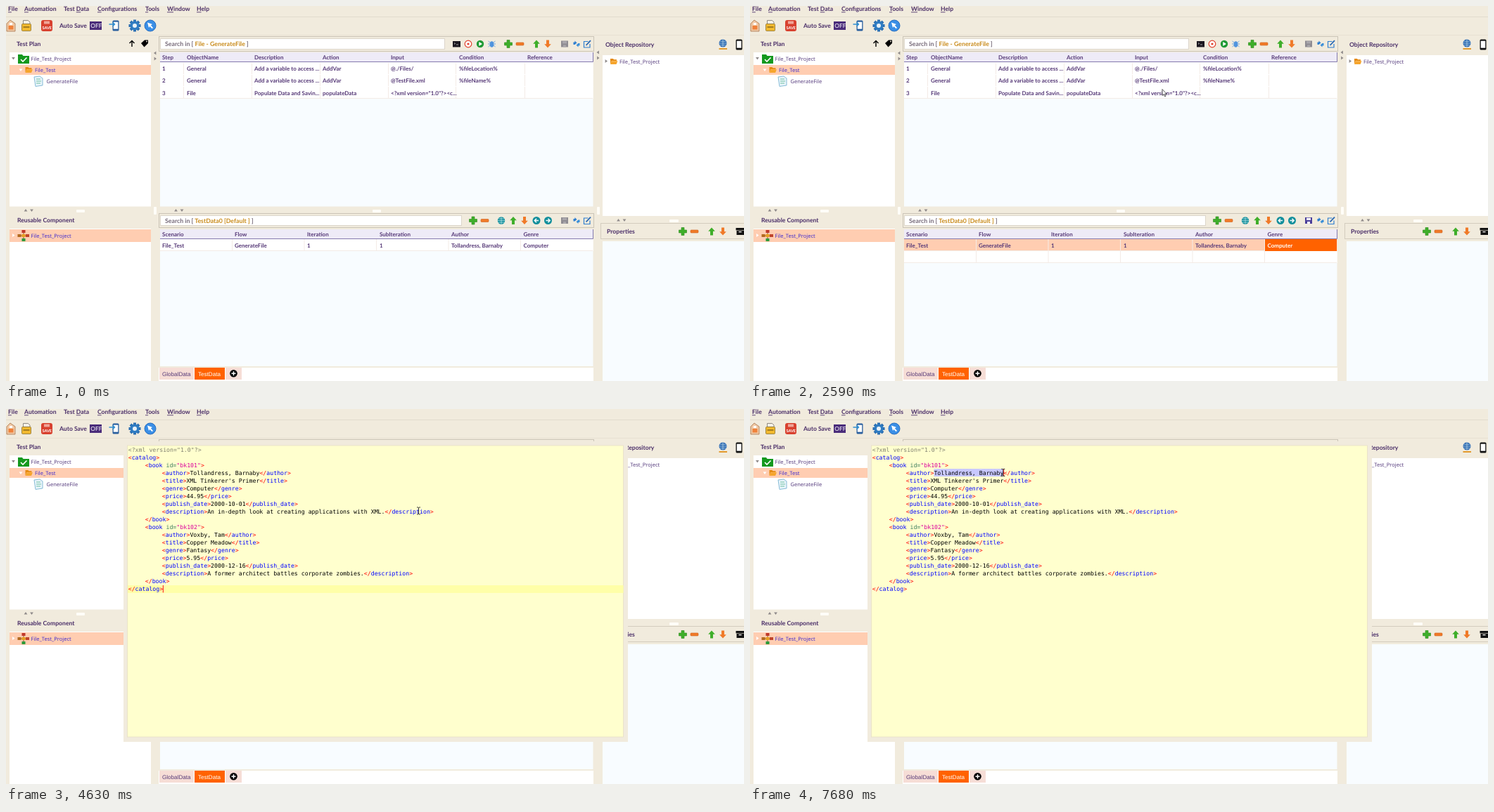
Write an HTML page that moves like this. It is 1049 px wide and 534 px high and loops after 8000 ms.

```html
<!DOCTYPE html>
<html lang="en">
<head>
<meta charset="utf-8">
<title>Test data editor</title>
<style>
html, body { margin: 0; width: 100%; height: 100%; overflow: hidden; background: #f1ebdd; }
svg { display: block; width: 100vw; height: 100vh; }
text { font: 700 8px Lato, sans-serif; fill: #573a78; text-rendering: geometricPrecision; white-space: pre; }
.ui { font-size: 8.6px; fill: #4a2e68; }
.find { font-size: 8.75px; fill: #776b7a; }
.gold { fill: #c98b1b; }
.tree { font: 400 7.5px "Noto Sans", sans-serif; fill: #5a4080; }
.on { fill: #4430cc; }
.tab { font: 400 8.1px "Liberation Sans", Arial, sans-serif; }
.code { font: 400 8.22px "DejaVu Sans Mono", monospace; fill: #000; }
.br { fill: #f00; } .tg { fill: #00f; } .at { fill: #3f7f5f; } .st { fill: #dc009c; } .pi { fill: #808070; }
.u { text-decoration: underline; }
</style>
</head>
<body>
<svg id="stage" viewBox="0 0 1049 534" preserveAspectRatio="none"></svg>
<script>
const PEACH = '#ffcdb1', ORANGE = '#ff6200', BODY = '#f8fcff', BACK = '#f1ebdd';
const GREEN = '#3fae2a', RUST = '#f07a28', TEAL = '#128f9c', BLUE = '#2f7fd0', GRID = '#f3ebe6';

const esc = s => s.replace(/&/g, '&amp;').replace(/</g, '&lt;').replace(/>/g, '&gt;');
const rect = (x, y, w, h, fill, more = '') => `<rect x="${x}" y="${y}" width="${w}" height="${h}" fill="${fill}" ${more}/>`;
const circle = (x, y, r, fill, more = '') => `<circle cx="${x}" cy="${y}" r="${r}" fill="${fill}" ${more}/>`;
const path = (d, fill, more = '') => `<path d="${d}" fill="${fill}" ${more}/>`;
const line = (d, color, w = 1, more = '') => path(d, 'none', `stroke="${color}" stroke-width="${w}" ${more}`);
const raw = (x, y, s, cls = '', more = '') => `<text x="${x}" y="${y}" class="${cls}" ${more}>${s}</text>`;
const text = (x, y, s, cls, more) => raw(x, y, esc(s), cls, more);
const span = (s, cls) => `<tspan class="${cls}">${esc(s)}</tspan>`;
const at = (x, y, s, more = '') => `<g transform="translate(${x} ${y})" ${more}>${s}</g>`;

// Icons, drawn around their centre
const plus = (x, y) => at(x, y, path('M-2-5.5H2V-2H5.5V2H2V5.5H-2V2H-5.5V-2H-2Z', GREEN, 'stroke="#2b8a1c" stroke-width=".6"'));
const minus = (x, y) => at(x, y, rect(-5.5, -2, 11, 4, RUST, 'rx="1" stroke="#cf5f1c" stroke-width=".6"'));
const arrow = (x, y, fill, turn = 0) => at(x, y, path('M0-5.5L4.8-.3H2V5.5H-2V-.3H-4.8Z', fill, `transform="rotate(${turn})"`));
const disk = (x, y, fill = '#8f8c92', label = '#aaa7ac') => at(x, y, rect(-5, -4.5, 10, 9, fill) + rect(-3, -3.8, 6, 3.2, label) + rect(-2, 1.5, 4, 3, label));
const swap = (x, y) => at(x, y, path('M-4.5 1V-2.5H-2.5V-4.5L.5-1.5-2.5 1Z', BLUE) + path('M4.5-1V2.5H2.5V4.5L-.5 1.8 2.5-1Z', '#3b8fd8'));
const edit = (x, y) => at(x, y, line('M1.5-3.5H-4.5V5H4V0', BLUE, 1.2) + line('M-1.5 2L5-4.8', '#2767b4', 1.8));
const globe = (x, y, r, c) => at(x, y, circle(0, 0, r, c) + line(`M${-r} 0H${r}M0${-r}V${r}M${-r * .8}${-r / 2}H${r * .8}M${-r * .8} ${r / 2}H${r * .8}`, '#d8f2f4', .6));
const turnTo = (x, y, dir) => at(x, y, circle(0, 0, 5.5, TEAL) + line('M-3 0H2.5M0-2.7L2.7 0 0 2.7', '#fff', 1.4, `transform="scale(${dir} 1)"`));
const folder = (x, y) => at(x, y, path('M-5-4H-1L0-2.8H4V-1H-3L-5 4Z', '#e58a12') + path('M-3-.8H5.4L3.6 4H-5Z', '#f6a52c'));
const tri = (x, y, turn, fill = '#8f8a8a') => path('M-2.4-1.4H2.4L0 2Z', fill, `transform="translate(${x} ${y}) rotate(${turn})"`);
const phone = (x, y, c) => rect(x - 4.5, y - 7.5, 9, 15, c, 'rx="1.6"') + rect(x - 3.2, y - 5.3, 6.4, 10, '#fff');

function menu() {
  const items = [[3, '', 'F', 'ile'], [26, '', 'A', 'utomation'], [82, 'Test ', 'D', 'ata'], [130, '', 'C', 'onfigurations'],
    [198, '', 'T', 'ools'], [229, '', 'W', 'indow'], [271, '', 'H', 'elp']];
  return items.map(([x, a, key, b]) => raw(x, 7.4, a + span(key, 'u') + b, 'ui')).join('') +
    line('M0 15.5H1049', '#e2dbcd') + line('M0 41.5H1049', '#e8e1d3');
}

function toolbar() {
  let gear = '';
  for (let a = 0; a < 360; a += 45) gear += rect(-2, -8.5, 4, 4, '#2c6fb2', `transform="rotate(${a})"`);
  return at(7, 28, path('M-6-3L-1-8 6-3V8H-6Z', '#f0c8a4', 'stroke="#a8744c" stroke-width=".8"') + rect(-3.5, 0, 7, 5.5, '#f0813a') + rect(-2, -4, 4, 3, '#fff')) +
    at(29, 28, path('M-4.5-2V-7.5H2.5L5-5V-2Z', '#f4f0e6', 'stroke="#77726a" stroke-width=".8"') + rect(-6.5, -2.5, 13, 10, '#f2b92f', 'rx="1.2" stroke="#8b7130" stroke-width=".8"') + line('M-4.5 2H4.5', '#8a6a1a', 1.5)) +
    at(58, 28, rect(-8, -8, 16, 16, '#d8412f', 'rx="3"') + rect(-4, -6.5, 8, 4, '#f0a598') + text(-6.6, 5, 'SAVE', '', 'style="font-size:5.6px;fill:#fff"')) +
    text(76, 31, 'Auto Save', 'ui') + rect(119, 22, 17, 12, '#4a2c7a') +
    text(120.3, 31.2, 'OFF', '', 'style="font-size:8.4px;fill:#fff;font-weight:400"') +
    phone(156, 28, '#2a5f9e') + line('M146.5 26H154M151.5 23L154.5 26 151.5 29', '#2f8fd0', 1.4) +
    at(183, 28, gear + circle(0, 0, 6.5, '#2f7cc2') + circle(0, 0, 3, '#e8f1f8')) +
    at(205, 28, circle(0, 0, 8, '#3b8fe6', 'stroke="#2a6fc0"') + path('M-4-4.5L3-2 .8-.4 4 3 2.6 4.3-.6 1-2 3Z', '#fff'));
}

function splitters() {
  const grip = (x, y, w, h) => rect(x, y, w, h, '#fffdf8', 'rx="1"');
  const pair = (x, y) => tri(x, y, 180) + tri(x + 8.5, y, 0);
  const side = (x, y) => tri(x, y, 90) + tri(x, y + 8, -90);
  return pair(28, 291) + pair(241.5, 291) + pair(870.5, 305) + side(212, 67) + side(841.5, 66) +
    grip(100, 290, 12, 4) + grip(521, 290, 12, 4) + grip(943, 304, 13, 4) + grip(210, 286, 4, 11) + grip(840, 286, 4, 11);
}

function leftSide() {
  const node = (x, y, c) => rect(x - 2.5, y - 2, 5, 4, c);
  return text(15, 57, 'Test Plan', 'ui') + line('M179 58V50M175.5 53L179 49.5 182.5 53', '#000', 1.4) +
    path('M192 53L197 48.5H202V53L196.5 58.5Z', '#000') + circle(200, 50.5, .9, BACK) +
    rect(5, 66, 201, 219.5, '#fff') + rect(5, 84, 201, 14, PEACH) +
    tri(10.5, 74.5, 0) + path('M17 69H23L24.5 71H33V82H17Z', '#15991f') + line('M21 76L24 79 29.5 73.5', '#fff', 1.6) +
    text(35.5, 78.2, 'File_Test_Project', 'tree') + tri(21, 91, 0, '#fff') + folder(32.5, 91) +
    text(41, 94, 'File_Test', 'tree on') +
    at(46, 107, path('M-6-6L2-7 6-4V6L-4 7.5Z', '#e9f5fb', 'stroke="#79b4d2" stroke-width=".9"') + line('M-3-3H3M-3 0H4M-3 3H3', '#6fbfa0', 1)) +
    text(57.5, 110, 'GenerateFile', 'tree') +
    text(16, 307.5, 'Reusable Component', 'ui') + rect(5, 317, 201, 217, '#fff') + rect(5, 318, 201, 18, PEACH) +
    tri(10.5, 326.5, -90, '#fff') + line('M25 321V333M18 327H31', '#8a5a30', 1) +
    node(25, 321, '#c0392b') + node(19, 327, '#b36a20') + node(25, 327, '#e8a020') + node(30.5, 327, '#c0452b') + node(25, 333, '#2c9a3a') +
    text(35.5, 329.8, 'File_Test_Project', 'tree on');
}

function rightSide() {
  return text(852, 58, 'Object Repository', 'ui') + globe(1019, 53, 5.5, '#2b66b0') + rect(1013.5, 60, 11.5, 2, '#e39a2d') + phone(1042, 55, '#111') +
    rect(848, 70, 201, 229, '#fff') + tri(853, 78.5, -90) + folder(864, 79) + text(872, 81.8, 'File_Test_Project', 'tree') +
    rect(845.5, 309.5, 210, 22, BACK, 'stroke="#d3ccbe"') + text(854, 324, 'Properties', 'ui') +
    plus(962, 321) + minus(978.5, 321) + arrow(1003, 321, GREEN) + arrow(1019, 321, RUST, 180) +
    rect(1037.5, 316, 12, 3.4, '#111') + rect(1038.5, 320, 11, 6, '#111') + rect(1041.5, 321, 4, 1.3, '#fff') +
    rect(848, 335, 201, 199, BODY);
}

function searchBar(y, h, w, name, tail) {
  return rect(217.5, y, 618, h, BACK, 'stroke="#cbc4b7"') + rect(219.5, y + 3, w, h - 6, '#fff', 'stroke="#dcd6cb"') +
    raw(226, y + 13.7, 'Search in [ ' + span(name, 'gold') + tail, 'find');
}
const heading = (y, xs, names) => rect(219, y, 615, 14, '#eeebf7') + line(`M219 ${y + 13.5}H834.5V${y}`, '#7a6ea6', .9) +
  names.map((n, i) => text(xs[i], y + 10.3, n)).join('');
const cells = (y, xs, row, ids = []) => row.map((s, i) => text(xs[i], y, s, '', ids[i] ? `id="${ids[i]}"` : '')).join('');
const dividers = (xs, y, h) => line(xs.map(x => `M${x} ${y}V${y + h}`).join('') + `M219 ${y + h - .5}H834`, GRID);

function stepTable() {
  const xs = [222, 257, 353, 450, 547, 644, 741], cols = [252.5, 349.5, 446.5, 543.5, 639.5, 737.5];
  const rows = [['1', 'General', 'Add a variable to access ...', 'AddVar', '@./Files/', '%fileLocation%'],
    ['2', 'General', 'Add a variable to access ...', 'AddVar', '@TestFile.xml', '%fileName%'],
    ['3', 'File', 'Populate Data and Savin...', 'populateData', '<?xml version="1.0"?><c...']];
  return searchBar(43.5, 21, 404, 'File - GenerateFile', ' ]') +
    rect(635, 50, 11, 8.5, '#1c1820') + line('M637 52.5L638.5 53.5 637 54.5M640 55H643', '#ddd', .7) +
    circle(657, 54, 4.8, '#fff', 'stroke="#e0402c" stroke-width="1.2"') + circle(657, 54, 1.6, '#e0402c') +
    circle(674, 54, 5.2, '#1f9a34') + path('M672.3 51L677 54 672.3 57Z', '#fff') +
    line('M685.5 50L695.5 58M695.5 50L685.5 58M685 54H696', '#6ba6e4', 1) + '<ellipse cx="690.5" cy="54.5" rx="2.8" ry="4.3" fill="#4f94de"/>' +
    plus(714, 54) + minus(730.5, 54) + arrow(754, 54, GREEN) + arrow(770, 54, RUST, 180) + disk(794, 54) + swap(811, 54) + edit(826, 54) +
    rect(219, 66, 615.5, 219.5, BODY) + heading(66, xs, ['Step', 'ObjectName', 'Description', 'Action', 'Input', 'Condition', 'Reference']) +
    rows.map((r, i) => {
      const y = 81 + i * 17;
      return rect(219, y - 1, 615.5, 18, '#fff') + dividers(cols, y, 17) + cells(92 + i * 17.3, xs, r);
    }).join('');
}

function dataTable() {
  const xs = [222, 325, 428, 531, 633, 735.5], cols = [321.5, 424, 526.5, 629, 731.5];
  return searchBar(295.5, 20, 428, 'TestData0 [Default ]', ' ]') +
    plus(664, 305.5) + minus(680.5, 305.5) + globe(704, 305.5, 5.2, TEAL) + arrow(721, 305.5, GREEN) + arrow(737, 305.5, RUST, 180) +
    turnTo(754, 305.5, -1) + turnTo(770.5, 305.5, 1) + disk(794, 305.5) + `<g id="saveOn">${disk(794, 305.5, '#4a3f9a', '#f4f2fa')}</g>` +
    swap(811, 305.5) + edit(826, 305.5) +
    rect(219, 318, 615.5, 195, BODY) + heading(318, xs, ['Scenario', 'Flow', 'Iteration', 'SubIteration', 'Author', 'Genre']) +
    rect(219, 332, 615.5, 17, '#fff', 'id="row"') + dividers(cols, 332, 17) +
    rect(630, 332, 102, 17, ORANGE, 'id="pickAuthor"') + rect(732, 332, 102, 17, ORANGE, 'id="pickGenre"') +
    cells(343.7, xs, ['File_Test', 'GenerateFile', '1', '1', 'Tollandress, Barnaby', 'Computer'], ['', '', '', '', 'author', 'genre']) +
    `<g id="newRow">${rect(219, 349, 615.5, 17, '#fff') + dividers(cols, 349, 17)}</g>` +
    rect(217, 515, 618, 19, '#fff') + rect(218, 515, 49, 17, '#f6ddd6') + rect(268, 515, 43, 17, ORANGE) + rect(312, 515, 23, 17, '#f6ddd6') +
    text(222, 527, 'GlobalData', 'tab') + text(273, 527, 'TestData', 'tab', 'style="fill:#fff"') +
    circle(323.5, 523.3, 5.3, '#000') + line('M320.5 523.3H326.5M323.5 520.3V526.3', '#fff', 1.5);
}

const CHAR = 4.95, NAME_X = 261.5, lineTop = i => 52 + i * 11.055;

function editor() {
  const open = (n, attr = '') => span('<', 'br') + span(n, 'tg') + attr + span('>', 'br');
  const close = n => span('</', 'br') + span(n, 'tg') + span('>', 'br');
  const book = (id, ...values) => {
    const names = ['author', 'title', 'genre', 'price', 'publish_date', 'description'];
    return [[1, open('book', span(' id=', 'at') + span(`"${id}"`, 'st'))],
      ...names.map((n, i) => [2, open(n) + esc(values[i]) + close(n)]), [1, close('book')]];
  };
  const lines = [[0, span('<?xml version="1.0"?>', 'pi')], [0, open('catalog')],
    ...book('bk101', 'Tollandress, Barnaby', "XML Tinkerer's Primer", 'Computer', '44.95', '2000-10-01', 'An in-depth look at creating applications with XML.'),
    ...book('bk102', 'Voxby, Tam', 'Copper Meadow', 'Fantasy', '5.95', '2000-12-16', 'A former architect battles corporate zombies.'),
    [0, close('catalog')]];
  return rect(167, 46, 717, 428, BACK) + rect(172.5, 52, 705, 415, '#ffffce', 'stroke="#e6dfc6" stroke-width=".8"') +
    rect(173, 0, 704.5, 11, '#ffffa8', 'id="current"') + rect(NAME_X, lineTop(3), 0, 11, '#c8c8ff', 'id="selection"') +
    lines.map(([depth, s], i) => raw(173.7 + depth * 24.05, 60.5 + i * 11.055, s, 'code')).join('') +
    rect(222.8, lineTop(18), 1.2, 10.5, '#f33', 'id="caret"');
}

const stage = document.getElementById('stage');
stage.innerHTML = rect(0, 0, 1049, 534, BACK) + menu() + toolbar() + splitters() + leftSide() + stepTable() + dataTable() + rightSide() +
  `<g id="hint">${rect(544.5, 132.5, 106, 23, '#fff', 'stroke="#e9e4dc"')}</g>` +
  `<g id="editor">${editor()}</g>` + circle(0, 0, 8.3, '#ffe900', 'id="halo" opacity=".68"') +
  `<g id="pointer">${path('M0 0V9L2.1 7.2 3.6 10.4 5 9.7 3.6 6.6H6.2Z', '#fff', 'stroke="#333" stroke-width=".8"')}</g>` +
  `<g id="beam">${line('M-2.5-5H-.6L0-4.4 .6-5H2.5M0-4.4V4.4M-2.5 5H-.6L0 4.4 .6 5H2.5', '#222', .9)}</g>`;

const el = {};
stage.querySelectorAll('[id]').forEach(n => el[n.id] = n);
const show = (id, on) => { el[id].style.display = on ? '' : 'none'; };

// Mouse path: start, end, number of steps, target
const moves = [[70, 330, 5, 675, 336], [470, 660, 4, 675, 339], [1070, 1310, 5, 787, 348], [1520, 1710, 4, 787, 342],
  [2180, 2590, 7, 586, 118.5], [3780, 4120, 6, 586.5, 145], [4670, 5330, 11, 259, 98], [5400, 6060, 11, 261, 90.5],
  [6350, 6740, 7, 348, 90.5], [6880, 6940, 2, 355.5, 90.5], [7140, 7200, 2, 359.8, 90.5]];

function mouse(t) {
  let x = 995, y = 525;
  for (const [from, to, n, tx, ty] of moves) {
    if (t < from) break;
    const p = Math.min(1, (Math.floor((t - from) / (to - from) * (n - 1) + .1) + 1) / n);
    const e = p * p * (3 - 2 * p);
    x += (tx - x) * e;
    y += (ty - y) * e;
  }
  return [x, y];
}

function draw(t) {
  const within = (a, b) => t >= a && t < b;
  const [x, y] = mouse(t), place = `translate(${x} ${y})`;
  const beam = t >= 3780 && (y > 133 || t > 4100);

  el.row.setAttribute('fill', t >= 1000 ? PEACH : '#fff');
  const onAuthor = within(1000, 1970), onGenre = within(1970, 3590);
  show('pickAuthor', onAuthor);
  show('pickGenre', onGenre);
  el.author.style.fill = onAuthor ? '#fff' : '';
  el.genre.style.fill = onGenre ? '#fff' : '';
  show('newRow', t >= 1970);
  show('saveOn', t >= 1970);
  show('hint', within(3590, 4530));
  show('editor', t >= 4630);

  const dragging = t >= 6350;
  el.current.setAttribute('y', lineTop(dragging ? 3 : 18));
  show('current', t < 6410);
  const chars = dragging ? Math.max(0, Math.min(20, Math.round((x - NAME_X) / CHAR))) : 0;
  el.selection.setAttribute('width', chars * CHAR);
  el.caret.setAttribute('x', dragging ? 360 : 222.8);
  el.caret.setAttribute('y', lineTop(dragging ? 3 : 18));
  show('caret', dragging ? t >= 7680 : (t - 4630) % 1000 < 500);

  show('halo', within(1000, 1070) || within(1970, 2030) || within(4390, 4530) || within(6350, 7460));
  show('pointer', t >= 70 && !beam);
  show('beam', beam);
  for (const id of ['halo', 'pointer', 'beam']) el[id].setAttribute('transform', place);
  el.beam.setAttribute('opacity', within(4530, 4630) ? .35 : 1);
}

const start = performance.now();
function tick() {
  draw((performance.now() - start) % 8000);
  requestAnimationFrame(tick);
}
tick();
</script>
</body>
</html>
```
